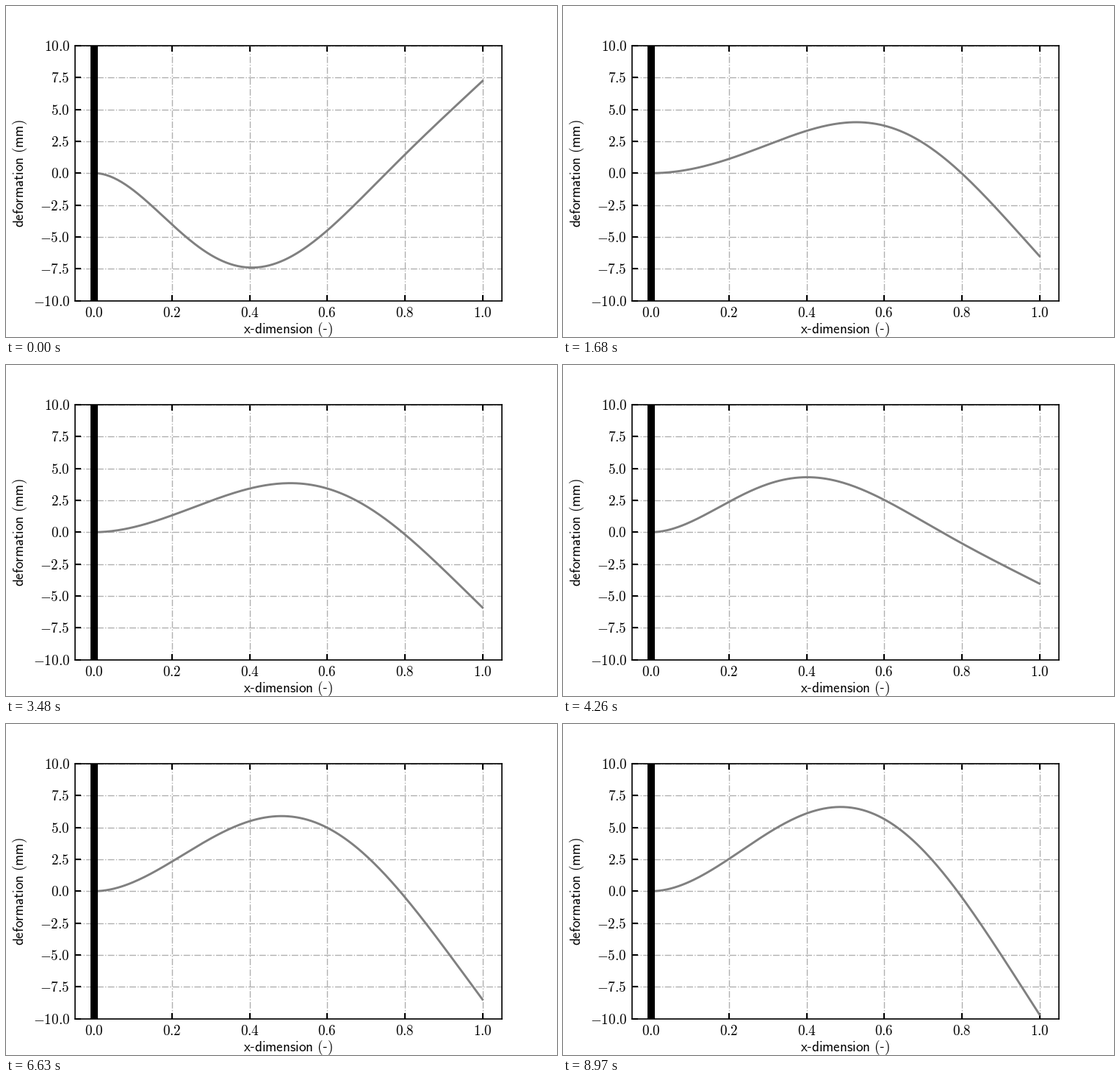
These frames come from a looping animation (750x450 px, 9000 ms). A matplotlib script:

```python
import numpy as np
import matplotlib.pyplot as plt
from matplotlib.animation import FuncAnimation

W, H, DPI = 750, 450, 100
FRAMES, INTERVAL = 300, 30

plt.rcParams.update({
    "font.family": "Liberation Sans",
    "mathtext.fontset": "cm",
    "font.size": 13.8,
    "axes.linewidth": 1.2,
})

# beta * L, sigma, amplitude, cycles per frame, phase in cycles
MODES = [
    (4.694091, 1.018467, 4.64, 0.01169, -0.0072),
    (7.854757, 0.999224, 1.02, 0.03275, -0.0085),
]


def mode_shape(x, beta, sigma):
    """Clamped-free bending mode of a uniform beam."""
    z = beta * x
    return np.cosh(z) - np.cos(z) - sigma * (np.sinh(z) - np.sin(z))


x = np.linspace(0, 1, 201)
SHAPES = [mode_shape(x, beta, sigma) for beta, sigma, *_ in MODES]


def deflection(n):
    return sum(-amp * np.cos(2 * np.pi * (freq * n + phase)) * shape
               for (_, _, amp, freq, phase), shape in zip(MODES, SHAPES))


def decimal(v, _):
    return rf"$\mathrm{{{v:.1f}}}$"


fig = plt.figure(figsize=(W / DPI, H / DPI), dpi=DPI, facecolor="white")
ax = fig.add_axes([0.125, 0.11, 0.775, 0.77])
ax.set(xlim=(-0.05, 1.05), ylim=(-10, 10),
       xticks=np.linspace(0, 1, 6), yticks=np.linspace(-10, 10, 9))
ax.xaxis.set_major_formatter(decimal)
ax.yaxis.set_major_formatter(decimal)
ax.tick_params(direction="in", length=6, width=1.5, top=True)
ax.tick_params(axis="x", pad=5.8)
ax.tick_params(axis="y", pad=5)
ax.grid(color="#b0b0b0", linestyle="-.", linewidth=1)

fig.text(384 / W, 10 / H, r"$\mathsf{x}$-$\mathsf{dimension\ (}$-$\mathsf{)}$",
         ha="center", va="center")
fig.text(19 / W, 222.5 / H, r"$\mathsf{deformation\ (mm)}$",
         ha="center", va="center", rotation=90)

ax.axvspan(-0.01, 0.01, color="black", linewidth=0, zorder=3)
beam, = ax.plot(x, deflection(0), color="#808080", linewidth=2.1, zorder=2.2)


def update(n):
    beam.set_ydata(deflection(n))
    return beam,


anim = FuncAnimation(fig, update, frames=FRAMES, interval=INTERVAL,
                     repeat=True, repeat_delay=0)
plt.show()
```
